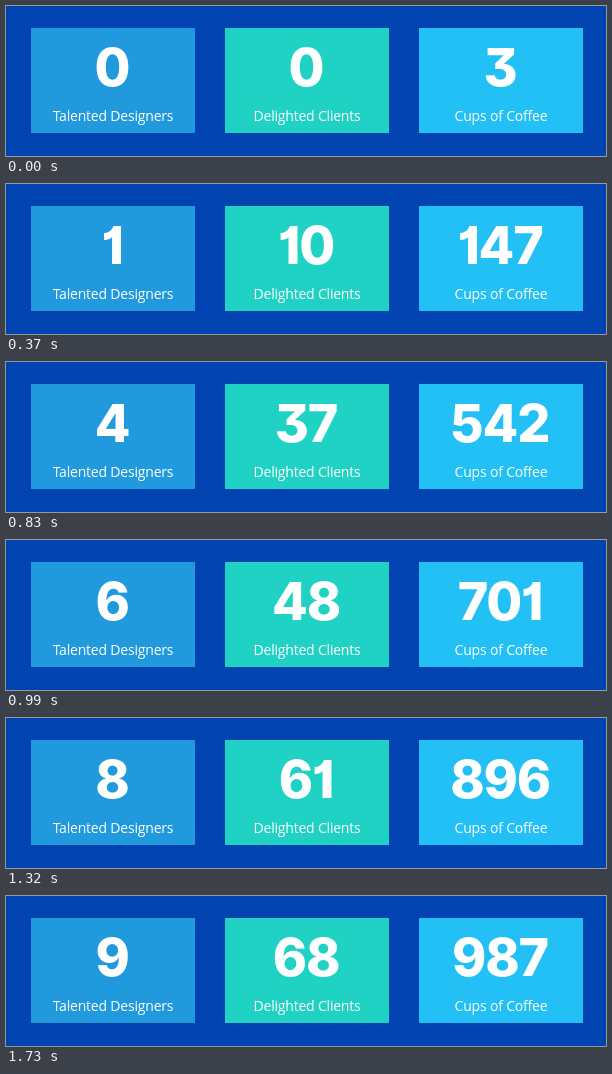
Animation, 600 px wide and 150 px high, one loop 2.35 s. Source, as an HTML page:

```html
<!DOCTYPE html>
<html lang="en">
<head>
<meta charset="utf-8">
<title>Counters</title>
<style>
  html, body { margin: 0; width: 100%; height: 100%; overflow: hidden; background: #0043b1; }
  svg { display: block; width: 100vw; height: 100vh; }
  text { fill: #fff; text-anchor: middle; }
  .count { font: 800 52px Inter, sans-serif; letter-spacing: -1.2px; font-feature-settings: "cv01", "cv09"; }
  .label { font: 400 14px "Open Sans", sans-serif; letter-spacing: -0.2px; }
</style>
</head>
<body>
<svg id="stage" viewBox="0 0 600 150"></svg>
<script>
const LOOP = 2350;
const STEP = 80;
const CUPS = 987;
const CARDS = [
  { color: "#209adc", label: "Talented Designers", total: 9 },
  { color: "#1fd2c4", label: "Delighted Clients", total: 68 },
  { color: "#23c0f6", label: "Cups of Coffee", total: CUPS }
];

// Pace of the count: [ms, cups so far].
const PACE = [[0, 3], [370, 147], [620, 307], [830, 542], [990, 701], [1320, 896], [1730, CUPS]];

const stage = document.getElementById("stage");

function add(tag, attrs, text = "") {
  const el = document.createElementNS("http://www.w3.org/2000/svg", tag);
  for (const key in attrs) el.setAttribute(key, attrs[key]);
  el.textContent = text;
  return stage.appendChild(el);
}

CARDS.forEach((card, i) => {
  const x = 25 + 194 * i;
  const mid = x + 82;
  add("rect", { x, y: 22, width: 164, height: 105, fill: card.color });
  card.count = add("text", { class: "count", x: mid - 1, y: 80 });
  add("text", { class: "label", x: mid, y: 115 }, card.label);
});

// Cosine easing and its inverse.
const swing = p => (1 - Math.cos(p * Math.PI)) / 2;
const unswing = share => Math.acos(1 - 2 * share) / Math.PI;

// Share of the totals at time t, held still between refreshes.
function shareAt(t) {
  const i = PACE.findIndex(([end]) => t < end);
  if (i < 0) return 1;
  const [t0, c0] = PACE[i - 1], [t1, c1] = PACE[i];
  const steps = Math.round((t1 - t0) / STEP);
  const held = Math.floor((t - t0) / (t1 - t0) * steps) / steps;
  const p0 = unswing(c0 / CUPS), p1 = unswing(c1 / CUPS);
  return swing(p0 + (p1 - p0) * held);
}

function render(time) {
  const share = shareAt(time % LOOP);
  for (const card of CARDS) {
    card.count.textContent = Math.floor(card.total * share + 1e-6);
  }
}

const start = performance.now();
function loop() {
  render(performance.now() - start);
  requestAnimationFrame(loop);
}
loop();
</script>
</body>
</html>
```
